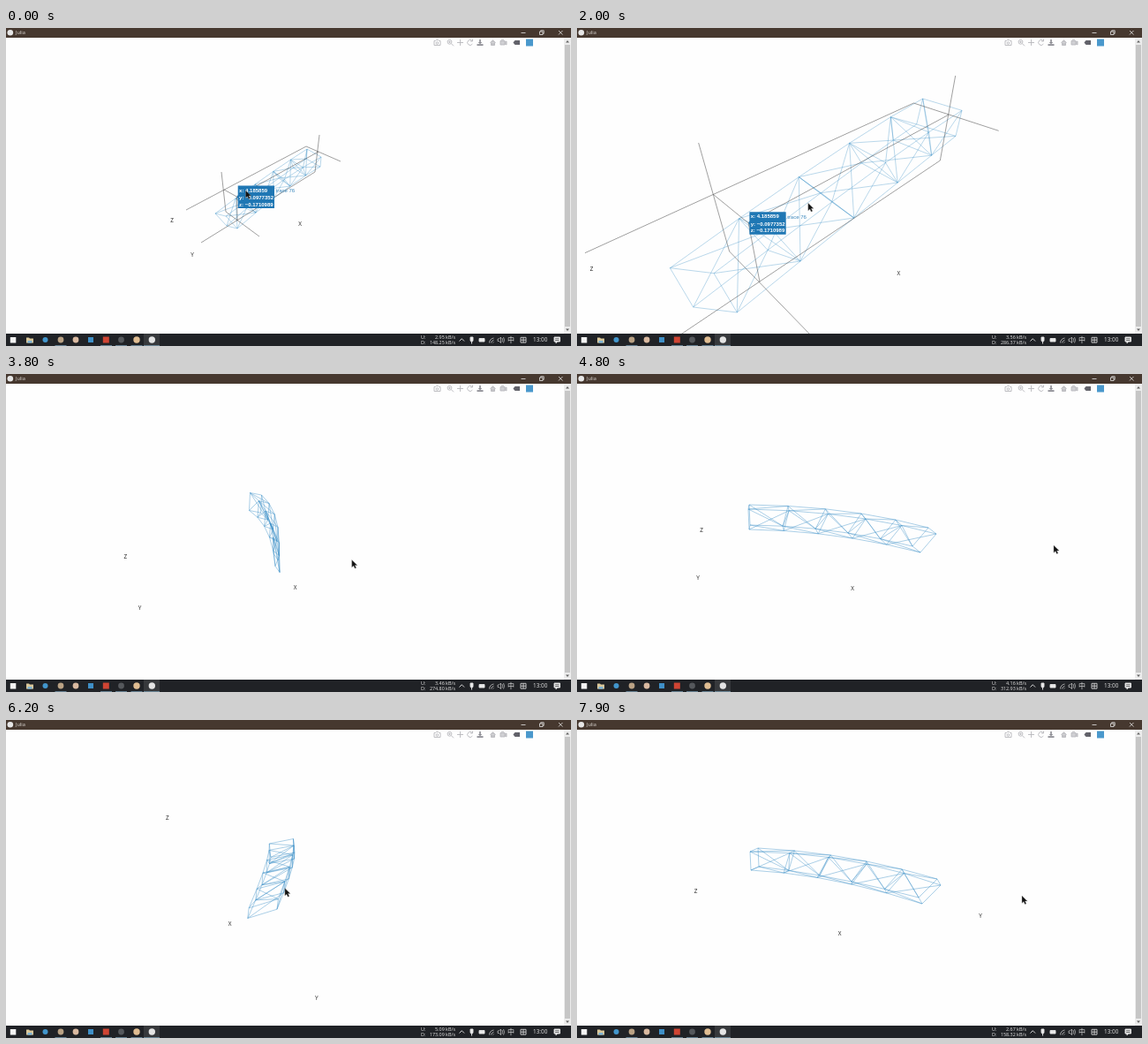
An HTML page for the animation above (8 s loop, 640x360 px).

```html
<!DOCTYPE html>
<html lang="en">
<head>
<meta charset="utf-8">
<title>Truss viewer</title>
<style>
html, body { margin: 0; width: 100%; height: 100%; overflow: hidden; background: #fefefe; }
svg { display: block; width: 100vw; height: 100vh; }
text { font-family: "Open Sans", "Noto Sans", sans-serif; white-space: pre; }
.tip text { font-family: "Liberation Sans", Arial, sans-serif; font-size: 6px; }
.axis { font-size: 6.4px; fill: #222; text-anchor: middle; }
.sys { font-size: 5.4px; fill: #e4e4e4; font-family: "Liberation Sans", Arial, sans-serif; }
</style>
</head>
<body>
<svg viewBox="0 0 640 360">
  <rect width="640" height="360" fill="#fefefe"/>
  <path id="truss" fill="none" stroke="#3a8fc6" stroke-width=".5"/>
  <path id="box" fill="none" stroke="#333" stroke-width=".55" stroke-opacity=".85"/>
  <g id="labels"></g>

  <g id="tip" class="tip">
    <path d="M0 0L1.200 -2V-12.600H42.500V13H1.200V2Z" fill="#1f77b4"/>
    <text id="tx" x="2.600" y="-5.400" fill="#fff" font-weight="bold"></text>
    <text id="ty" x="2.600" y="2.700" fill="#fff" font-weight="bold"></text>
    <text id="tz" x="2.600" y="10.600" fill="#fff" font-weight="bold"></text>
    <text id="trace" x="44" y="-5" fill="#3a87bd"></text>
  </g>

  <!-- plot toolbar -->
  <g fill="none" stroke="#b8b8bd" stroke-width=".9">
    <path d="M485 14.500h1.500l1-1h2l1 1h1.500v5h-7z"/><circle cx="488.400" cy="17" r="1.300"/>
    <circle cx="502.500" cy="15.800" r="2.400"/><path d="M504.500 17.800l2.500 2.500M501.300 15.800h2.400M502.500 14.600v2.400"/>
    <path d="M511 16.500h7M514.500 13v7"/>
    <path d="M528 14.500a3 3 0 1 0 .3 3.500M528.500 12.500v2.500h-2.500"/>
    <path d="M548.500 16.700l3-3 3 3M549.500 16.500v3h4v-3" fill="#c4c4c8"/>
    <path d="M560 14.500h5v4.500h-5zM565 16l2-1v4l-2-1M561 13h3" fill="#d0d0d4"/>
  </g>
  <path d="M536.200 13h1.600v3h1.500l-2.300 2.200-2.300-2.200h1.500zM533.500 18.300h7v1.700h-7z" fill="#8b8b92"/>
  <path d="M574.500 16.500l2-2.500h5.500v5h-5.500z" fill="#62626a"/>
  <rect x="589" y="12.500" width="8" height="8" fill="#4a98cc"/>

  <!-- scrollbar -->
  <rect x="632" y="11" width="8" height="335" fill="#ececec"/>
  <rect x="633" y="19" width="6" height="319" fill="#c6c6c6"/>
  <path d="M634 16.500l2-2.500 2 2.500zM634 340.500l2 2.500 2-2.500z" fill="#666"/>

  <!-- title bar -->
  <rect width="640" height="11" fill="#46382f"/>
  <circle cx="4.800" cy="5.200" r="3.300" fill="#e6e6e6"/>
  <text x="11" y="7.400" font-size="5.600" fill="#e0dcd8">Julia</text>
  <path d="M583.500 5.500h5M604.500 4h3.500v3.500h-3.500zM605.700 4V2.800h3.500v3.500H608M626 3l4.500 4.500M630.500 3L626 7.500" fill="none" stroke="#eee" stroke-width=".75"/>

  <!-- taskbar -->
  <rect y="346" width="640" height="14" fill="#202226"/>
  <rect x="156" y="346" width="18" height="14" fill="#37393c"/>
  <rect x="4.800" y="350" width="6.500" height="6.500" fill="#f4f4f4"/>
  <path d="M23 350.500h3l1 1h4v5h-8z" fill="#d9c79a"/><path d="M24.500 354h5v2.500h-5z" fill="#7db4d8"/>
  <circle cx="44.500" cy="353" r="3" fill="#4296cc"/>
  <circle cx="62" cy="353" r="3.400" fill="#b9a184"/>
  <circle cx="79" cy="353" r="3.400" fill="#d9b9a0"/>
  <rect x="93" y="350" width="6" height="6" fill="#3f8fc6"/>
  <rect x="109.800" y="349.500" width="7" height="7" fill="#cf4433"/>
  <circle cx="130.500" cy="353" r="3.400" fill="#55585c"/>
  <circle cx="148" cy="353" r="3.700" fill="#e0bd92"/>
  <circle cx="165.300" cy="353" r="3.700" fill="#e4e4e4"/>
  <path d="M55.500 359.500h13M107 359.500h13M124 359.500h13M141.500 359.500h13M156 359.500h18" stroke="#7898ac" stroke-width=".8"/>
  <g class="sys">
    <text x="470" y="351.800">U:</text><text x="470" y="358">D:</text>
    <text id="up" x="509" y="351.800" text-anchor="end"></text>
    <text id="down" x="509" y="358" text-anchor="end"></text>
    <text x="568" y="356" style="font-size:8px;font-family:'Noto Sans CJK SC','Noto Sans CJK',sans-serif">中</text>
    <text x="597" y="355.400" style="font-size:6.400px">13:00</text>
  </g>
  <g fill="none" stroke="#e8e8e8" stroke-width=".9">
    <path d="M513.500 354.500l2.800-2.800 2.800 2.800"/>
    <path d="M526 350v3.500a1.500 1.500 0 0 0 3 0V350zM527.500 355v2.500" fill="#e8e8e8"/>
    <path d="M536 351.500h6v3.500h-6z" fill="#e8e8e8"/>
    <path d="M547.500 356.500a6 6 0 0 1 5-5.500M549.500 356.500a4 4 0 0 1 3-3.200M551.500 356.500l1-1" stroke-opacity=".75"/>
    <path d="M557 352h1.500l2-2v6.500l-2-2H557zM562 351a4 4 0 0 1 0 4.500M563.500 350a6 6 0 0 1 0 6.500" stroke-width=".6"/>
    <path d="M583 350.300h6v5.800h-6zM583 353.200h6M586 350.300v5.800" stroke-width=".8"/>
    <path d="M621 350h6.500v5h-3l-1.500 1.800V355h-2z" fill="#e8e8e8"/>
    <path d="M622 351.700h4.500M622 353.500h4.500" stroke="#202226" stroke-width=".6"/>
  </g>
  <path id="cursor" d="M0 0V8.300L2 6.600 3.400 9.600 4.900 8.900 3.500 6H6.100Z" fill="#111" stroke="#888" stroke-width=".4"/>
</svg>
<script>
const LOOP = 8000, STEP = 100, TIP_END = 3300;
const $ = id => document.getElementById(id);
const mix = (a, b, k) => a.map((v, i) => v + (b[i] - v) * k);

// Chords a, c, d: joints 0 (free end), 2 and 5 (fixed end), as x, y pairs.
// Axis names: X, Y, Z positions.  box: seven corners, then six line ends.
const near = {
  a: [237, 210, 282, 177, 341, 137], c: [249, 213, 291, 183, 340, 148], d: [262, 227, 303, 193, 356, 157],
  names: [333, 222, 211, 257, 188, 218], mouse: [271.500, 184],
  box: [247, 183, 340, 134, 354, 140, 261.500, 191, 249, 208, 262, 218, 350, 163,
    204, 206, 379, 151, 355, 121, 244, 163, 287, 236, 221, 243]
};
const zoomed = {
  a: [58, 294, 241, 166, 408, 62], c: [122, 300, 272, 188, 399, 97], d: [152, 356, 317, 223, 453, 112],
  names: [375, 296, 60, 400, -40, 290], mouse: [271, 184],
  box: [124, 190, 394, 70, 431, 81, 160.500, 222.500, 148, 267, 179, 302, 420, 141,
    -60, 272, 509, 105, 441, 29, 101, 118, 260, 388, 60, 381]
};
const corner = {
  a: [200, 227, 272, 174, 359, 116], c: [221, 233, 285, 184, 356, 133], d: [240, 254, 307, 199, 381, 143],
  names: [343, 240, 166, 299, 129.500, 237], mouse: [243.500, 227],
  box: [216, 186, 356, 115, 400, 133, 261.500, 217.500, 222, 225, 263, 258, 394, 168,
    147, 220, 415, 139, 404, 104, 211, 154, 277, 270, 198, 302]
};
const side = {
  a: [407, 181, 327, 164, 194, 153], c: [389, 202, 312, 186, 195, 176], d: [380, 195, 307, 180, 196, 171],
  names: [312, 243, 137, 231, 141, 177], mouse: [540, 194]
};
const above = {
  a: [295, 93, 321, 148, 361, 270], c: [297, 108, 315, 156, 349, 265], d: [268, 113, 285, 160, 313, 272],
  names: [245.500, 220, 345, 354, 218, 108], mouse: [336, 251]
};
const below = {
  a: [361, 183, 329, 158, 247, 124], c: [362, 199, 335, 180, 258, 155], d: [337, 205, 307, 188, 228, 169],
  names: [263, 244, 360, 268, 142, 113], mouse: [292.500, 120]
};
const turned = {
  a: [412, 187, 328, 163, 196, 149], c: [391, 208, 311, 186, 197, 170], d: [387, 201, 311, 183, 206, 166],
  names: [297.500, 241.500, 457, 222, 134.500, 193.500], mouse: [504, 199]
};
const keys = [
  [0, near], [1000, near], [1500, zoomed], [1700, zoomed], [2600, corner], [2800, corner],
  [4800, side], [5600, above], [6900, below], [7900, turned]
];
const net = [
  [0, "2.95", "148.25"], [1200, "3.56", "286.37"], [2200, "3.46", "274.80"], [4000, "4.16", "312.93"],
  [5200, "3.33", "298.37"], [6200, "5.09", "173.09"], [7200, "2.67", "158.32"]
];

const names = ["X", "Y", "Z"].map(s => {
  const el = document.createElementNS("http://www.w3.org/2000/svg", "text");
  el.textContent = s;
  el.setAttribute("class", "axis");
  $("labels").append(el);
  return el;
});

function poseAt(t) {
  let i = 0;
  while (i < keys.length - 2 && t >= keys[i + 1][0]) i++;
  const [t0, p] = keys[i], [t1, q] = keys[i + 1];
  const k = Math.min(1, (t - t0) / (t1 - t0)), out = {};
  for (const part in p) out[part] = q[part] ? mix(p[part], q[part], k) : p[part];
  return out;
}

// Quadratic through joints 0, 2 and 5
function chord(p) {
  return Array.from({ length: 6 }, (_, s) => {
    const u = (s - 2) * (s - 5) / 10, v = s * (5 - s) / 6, w = s * (s - 2) / 15;
    return [0, 1].map(i => u * p[i] + v * p[i + 2] + w * p[i + 4]);
  });
}

const seg = (p, q) => `M${p[0].toFixed(2)} ${p[1].toFixed(2)}L${q[0].toFixed(2)} ${q[1].toFixed(2)}`;

function trussPath(p) {
  const a = chord(p.a), c = chord(p.c), d = chord(p.d);
  const b = a.map((v, s) => v.map((x, i) => x + d[s][i] - c[s][i]));
  let path = "";
  for (let s = 0; s < 6; s++) {
    path += seg(a[s], b[s]) + seg(b[s], d[s]) + seg(d[s], c[s]) + seg(c[s], a[s]);
    if (s > 0 && s < 5) path += seg(a[s], d[s]);
    if (s === 5) break;
    const n = s + 1;
    for (const line of [a, b, c, d]) path += seg(line[s], line[n]);
    path += seg(a[s], c[n]) + seg(b[n], d[s]) + seg(b[s], a[n]) + seg(d[n], c[s]) + seg(a[n], d[s]);
  }
  return path;
}

const boxLines = [[1, 7], [1, 8], [9, 6], [2, 3], [10, 4], [0, 3], [3, 5], [4, 11], [6, 12]];
const boxPath = b => boxLines.map(([i, j]) => seg(b.slice(2 * i), b.slice(2 * j))).join("");

const move = (el, x, y) => el.setAttribute("transform", `translate(${x.toFixed(2)} ${y.toFixed(2)})`);

function draw(ms) {
  const t = Math.floor(ms % LOOP / STEP) * STEP;
  const p = poseAt(t), hover = t < TIP_END;
  $("truss").setAttribute("d", trussPath(p));
  $("truss").setAttribute("stroke-opacity", hover ? .7 : .85);
  $("box").setAttribute("d", hover ? boxPath(p.box) : "");
  $("tip").setAttribute("visibility", hover ? "visible" : "hidden");
  if (hover) move($("tip"), p.box[6], p.box[7]);

  const first = t < 2600;
  $("tx").textContent = first ? "x: 4.185859" : "x: 4.252775";
  $("ty").textContent = first ? "y: −0.0977352" : "y: 0.9006791";
  $("tz").textContent = first ? "z: −0.1710989" : "z: −0.1796759";
  $("trace").textContent = first ? "trace 76" : "trace 70";

  names.forEach((el, i) => move(el, p.names[2 * i], p.names[2 * i + 1] + 2.2));
  move($("cursor"), p.mouse[0], p.mouse[1]);
  const rate = net.filter(n => n[0] <= t).pop();
  $("up").textContent = rate[1] + " kB/s";
  $("down").textContent = rate[2] + " kB/s";
}

const start = performance.now();
function tick() {
  draw(performance.now() - start);
  requestAnimationFrame(tick);
}
tick();
</script>
</body>
</html>
```
